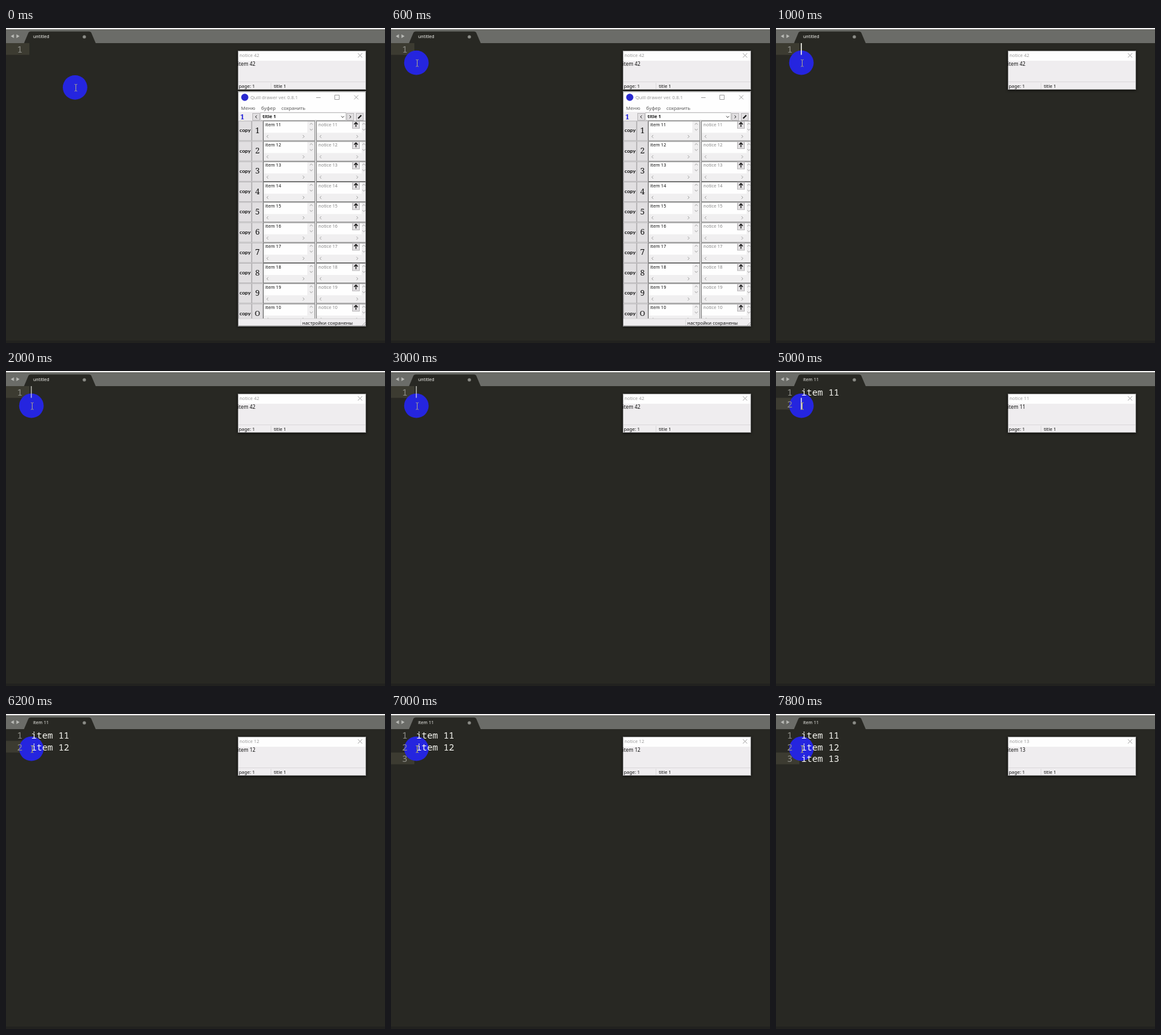
These frames come from a looping animation (600x500 px, 8 s). An HTML page:

```html
<!DOCTYPE html>
<html lang="en">
<head>
<meta charset="utf-8">
<title>Clipboard rows</title>
<style>
html, body { margin: 0; width: 600px; height: 500px; overflow: hidden; background: #282823; }
svg { display: block; }
text { white-space: pre; font-family: "Noto Sans", "Open Sans", sans-serif; font-size: 7.4px; }
.code text { font-family: "Noto Sans Mono", monospace; font-size: 14.3px; }
.window { filter: drop-shadow(0 1px 2px rgba(0,0,0,.75)); }
</style>
</head>
<body>
<svg id="stage" width="600" height="500" viewBox="0 0 600 500"></svg>
<script>
const STEP = 200, LOOP = 8000;
const LINE_TOP = 24, LINE_HEIGHT = 18.6, TEXT_X = 40, CHAR_WIDTH = 8.58;
const WIN_X = 367, WIN_W = 203;

const rect = (x, y, w, h, fill, extra = '') =>
  `<rect x="${x}" y="${y}" width="${w}" height="${h}" fill="${fill}" ${extra}/>`;
const label = (x, y, str, fill = '#111', extra = '') =>
  `<text x="${x}" y="${y}" fill="${fill}" ${extra}>${str}</text>`;
const stroke = (d, color, width = 1) =>
  `<path d="${d}" fill="none" stroke="${color}" stroke-width="${width}"/>`;
const outline = (x, y, w, h, color) =>
  rect(x + .5, y + .5, w - 1, h - 1, 'none', `stroke="${color}"`);
const cross = (x, y, r) =>
  stroke(`M${x - r} ${y - r}l${2 * r} ${2 * r}m0 ${-2 * r}l${-2 * r} ${2 * r}`, '#8c8c8c', .8);

// Chevrons point along (dx, dy).
function chevron(x, y, dx, dy, color = '#a0a0a0', size = 2.3) {
  const tip = [x + dx * size / 2, y + dy * size / 2];
  const back = side => `${tip[0] - dx * size + side * dy * size} ${tip[1] - dy * size + side * dx * size}`;
  return stroke(`M${back(1)}L${tip}L${back(-1)}`, color);
}

function button(x, y, w, h, fill = '#e1dfe1') {
  return rect(x + .5, y + .5, w - 1, h - 1, fill, 'stroke="#b9b7b9"');
}

function windowBody(y, h, titleHeight) {
  return `<g class="window">${rect(WIN_X, y, WIN_W, h, '#efedef')}</g>` +
    rect(WIN_X, y, WIN_W, titleHeight, '#fefefe');
}

function field(x, y, w, barX, str, color, leftX, rightX) {
  return rect(x, y, w, 32, '#fefefe') +
    rect(barX, y + 1, x + w - barX, 18, '#f0eff0') +
    rect(x, y + 19, w, 13, '#f0eff0') +
    outline(x, y, w, 32.25, '#777') +
    label(x + 3.5, y + 8.7, str, color, 'style="font-size:7.1px"') +
    chevron((barX + x + w) / 2, y + 5, 0, -1) +
    chevron((barX + x + w) / 2, y + 14, 0, 1) +
    chevron(leftX, y + 25, -1, 0) + chevron(rightX, y + 25, 1, 0);
}

function row(i) {
  const y = 147.25 + i * 32.25, digit = (i + 1) % 10;
  return button(368, y, 21, 32) + button(389, y, 18, 32) +
    label(378.5, y + 18.2, 'copy', '#111',
      'text-anchor="middle" style="font:bold 8.2px Lato,sans-serif"') +
    label(398, y + 19.5, digit || 'O', '#111',
      `text-anchor="middle" style="font:500 ${digit ? 12.8 : 11.5}px 'Noto Serif',serif"`) +
    field(407, y, 82.5, 477, `item 1${digit}`, '#111', 414, 471) +
    field(491, y, 79, 563, `notice 1${digit}`, '#858585', 498, 556) +
    button(548, y + .5, 12, 12) +
    stroke(`M554 ${y + 9.7}v-7m-3 3l3 -3l3 3`, '#111', 1.3);
}

function panel() {
  const rows = Array.from({ length: 10 }, (_, i) => row(i)).join('');
  return `<g id="panel">${windowBody(100.5, 373, 32.5)}` +
    '<circle cx="378" cy="110" r="5.7" fill="#2929cf"/>' +
    label(387, 113, 'Quill drawer ver. 0.8.1', '#999') +
    stroke('M491 110.5h7M520.5 106.5h7v7h-7z', '#8c8c8c', .8) + cross(554.5, 110, 3.3) +
    label(372, 129.5, 'Меню', '#555', 'style="font-size:7.7px"') +
    label(404, 129.5, 'буфер', '#555', 'style="font-size:7.6px"') +
    label(436, 129.5, 'сохранить', '#555') +
    label(371, 144.5, '1', '#1616d8', `style="font:bold 11px 'Noto Serif',serif"`) +
    button(390, 135, 12, 12) + chevron(396, 141, -1, 0, '#222') +
    rect(403, 134.5, 135, 12, '#fefefe', 'stroke="#a9a9a9" stroke-width=".7"') +
    label(406, 143.2, 'title 1', '#111', 'font-weight="bold"') +
    chevron(533, 141, 0, 1, '#444') +
    button(539, 135, 12, 12) + chevron(545, 141, 1, 0, '#222') +
    button(554, 135, 12, 12) + stroke('M557.5 143.5l5 -5', '#111', 2) +
    `<g clip-path="url(#rowsClip)">${rows}</g>` +
    stroke('M367 461.5h203', '#d4d3d4', .8) +
    stroke('M466.5 463v10', '#d4d3d4', .8) +
    label(469, 471, 'настройки сохранены') +
    stroke('M564 472l5 -5M567 472l2 -2', '#aaa', .9) +
    outline(WIN_X, 100.5, WIN_W, 373, '#777') + '</g>';
}

function notice() {
  return windowBody(36, 62, 16) +
    outline(WIN_X, 36, WIN_W, 62, '#999') +
    label(369.5, 46.3, '', '#9b9b9b', 'id="noticeTitle" style="font-size:7.3px"') +
    cross(560.5, 43.5, 3.3) +
    label(366.7, 60, '', '#111', 'id="noticeText" style="font-size:8px"') +
    stroke('M368 85.5h201M419.5 87v10', '#d6d4d6', .8) +
    label(368.5, 95, 'page: 1') + label(424, 95, 'title 1');
}

function editor() {
  let lines = '';
  for (let i = 0; i < 3; i++) {
    const y = 39 + i * LINE_HEIGHT;
    lines += `<g id="line${i}">${label(17.5, y, i + 1, '#90908a')}${label(TEXT_X, y, `item 1${i + 1}`, '#f8f8f2', `id="code${i}"`)}</g>`;
  }
  return rect(0, 0, 600, 500, '#282823') + rect(0, 0, 600, 24, '#6b6c68') +
    rect(0, 0, 600, 2, '#f3f3f2') +
    '<path d="M28.5 24L35.5 7.5Q36.5 5.5 39 5.5H131.5Q134 5.5 135 7.5L142 24Z" fill="#282823"/>' +
    '<path d="M12.5 10v6l-5 -3zM16.5 10v6l5 -3z" fill="#b9bab6"/>' +
    label(43, 16.2, '', '#f2f2ee', 'id="tabTitle" style="font-size:7px"') +
    '<circle cx="124" cy="14" r="2.6" fill="#8b8c87"/>' +
    rect(0, 496, 600, 4, '#22221f') +
    rect(0, 0, 37, LINE_HEIGHT, '#3c3b31', 'id="activeLine"') +
    '<circle id="halo" r="19.4" fill="#2525df"/>' +
    `<g class="code">${lines}</g>` +
    rect(0, 0, 1.6, LINE_HEIGHT, '#f8f8f0', 'id="caret"');
}

const stage = document.getElementById('stage');
stage.innerHTML =
  '<defs><clipPath id="rowsClip"><rect x="367" y="147" width="203" height="314"/></clipPath></defs>' +
  editor() + notice() + panel() +
  '<path id="beam" d="M-2 -5.5Q0 -5.5 0 -4Q0 -5.5 2 -5.5M0 -4V4M-2 5.5Q0 5.5 0 4Q0 5.5 2 5.5" fill="none"/>';

const el = id => document.getElementById(id);
const set = (id, attrs) => Object.entries(attrs).forEach(([k, v]) => el(id).setAttribute(k, v));
const show = (id, visible) => set(id, { visibility: visible ? 'visible' : 'hidden' });
const latest = (list, t) => list.filter(item => item.at <= t).pop();

const pointer = [
  { at: 0, x: 109.3, y: 94.3 }, { at: 200, x: 72, y: 72 },
  { at: 400, x: 31, y: 56 }, { at: 600, x: 40.2, y: 55.2 }
];
// Each edit resets the caret blink; "pasted" counts finished lines.
const edits = [
  { at: 0, line: 0, pasted: 0 }, { at: 1000, line: 0, pasted: 0 },
  { at: 3400, line: 0, pasted: 1 }, { at: 4800, line: 1, pasted: 1 },
  { at: 5600, line: 1, pasted: 2 }, { at: 6400, line: 2, pasted: 2 },
  { at: 7200, line: 2, pasted: 3 }
];

function caretLevel(age) {
  const fade = age < 1000 ? [1, .88, .45, 0, 0] : [.65, 1, .45, 0, 0];
  return fade[Math.floor(age % 1000 / STEP)];
}

function render(time) {
  const t = Math.floor(time % LOOP / STEP) * STEP;
  const { x, y } = latest(pointer, t);
  const { at, line, pasted } = latest(edits, t);
  const lineY = LINE_TOP + line * LINE_HEIGHT;
  const number = pasted ? 10 + pasted : 42;

  set('halo', { cx: x, cy: y });
  set('beam', { transform: `translate(${x + 1.3} ${y + .5})`, stroke: line ? '#c9c44e' : '#aaa68e' });
  set('activeLine', { y: lineY });
  set('caret', {
    x: TEXT_X - .7 + (pasted > line ? 7 * CHAR_WIDTH : 0),
    y: lineY,
    opacity: t < 1000 ? 0 : caretLevel(t - at)
  });
  for (let i = 0; i < 3; i++) {
    show(`line${i}`, i <= line);
    show(`code${i}`, i < pasted);
  }
  show('panel', t < 1000);
  el('tabTitle').textContent = pasted ? 'item 11' : 'untitled';
  el('noticeTitle').textContent = `notice ${number}`;
  el('noticeText').textContent = `item ${number}`;
}

const start = performance.now();
function tick() {
  render(performance.now() - start);
  requestAnimationFrame(tick);
}
tick();
</script>
</body>
</html>
```
